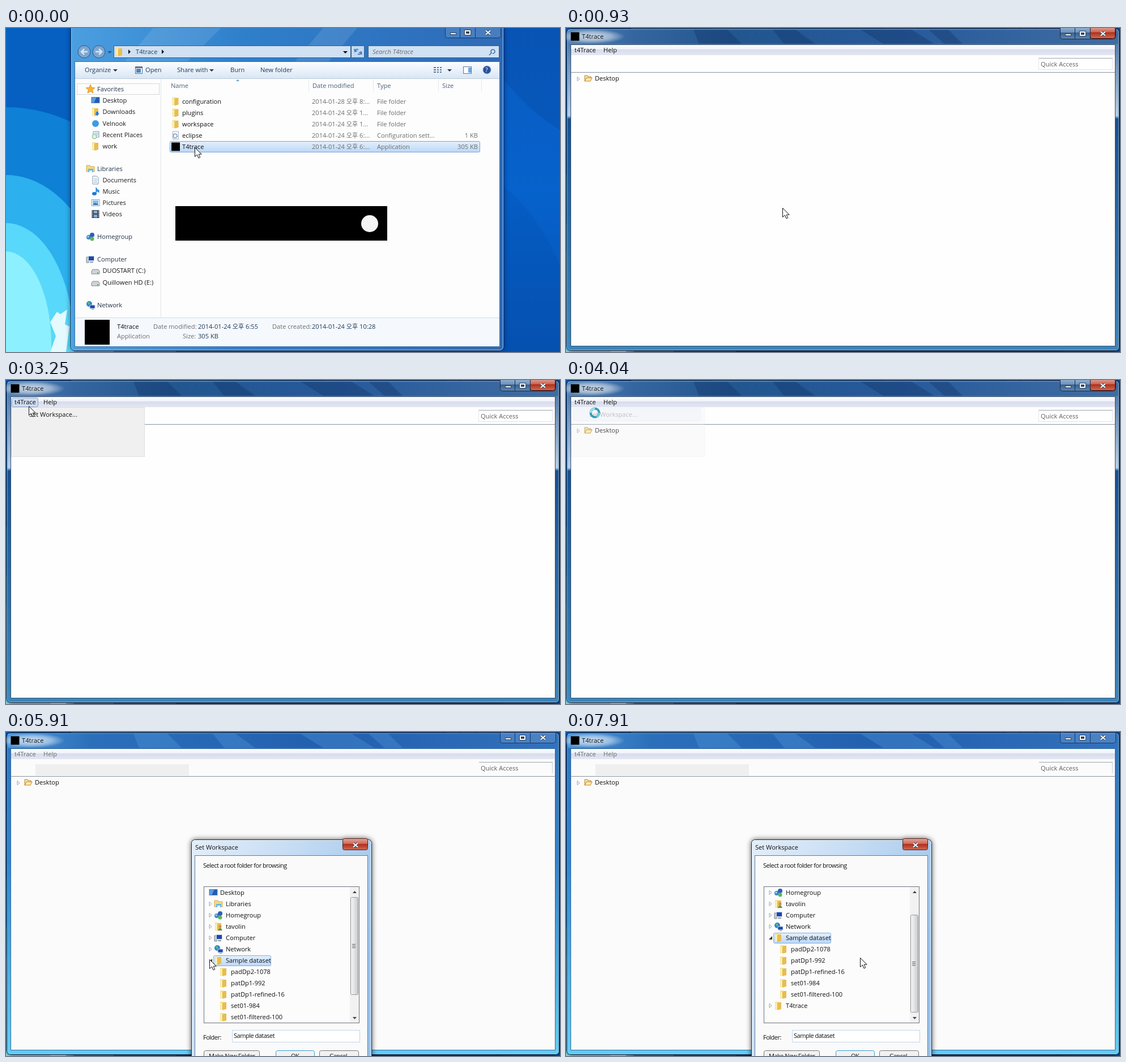
These frames come from a looping animation (978 by 573 pixels, 8 s). An HTML page:

```html
<!DOCTYPE html>
<html lang="en">
<head>
<meta charset="utf-8">
<title>Set Workspace</title>
<style>
html, body { margin: 0; width: 100%; height: 100%; overflow: hidden; background: #0a5cb8; }
svg { position: absolute; left: 0; top: 0; width: 978px; height: 573px; overflow: visible; }
text { font: 11.1px "Open Sans", "Noto Sans CJK KR", "Noto Sans CJK", sans-serif; white-space: pre; }
.tight { font-size: 11px; letter-spacing: -.5px; }
.it { font-style: italic; }
.shade { filter: drop-shadow(0 0 4px rgba(0, 15, 50, .6)); }
#main { transform-origin: 489px 286px; filter: drop-shadow(0 0 6px rgba(0, 10, 40, .8)); }
#dlg { transform-origin: 486px 390px; filter: drop-shadow(0 0 5px rgba(0, 0, 0, .65)); }
</style>
</head>
<body>
<svg id="desk">
  <defs>
    <linearGradient id="skyR" x2="0" y2="1"><stop stop-color="#0a5cc0"/><stop offset=".5" stop-color="#0662cc"/><stop offset="1" stop-color="#0654b4"/></linearGradient>
    <linearGradient id="glass"><stop stop-color="#4b9fe0"/><stop offset=".4" stop-color="#2f7fcb"/><stop offset="1" stop-color="#2f6ab6"/></linearGradient>
    <linearGradient id="bar" x2="0" y2="1"><stop stop-color="#fbfdff"/><stop offset=".5" stop-color="#eaf2fb"/><stop offset="1" stop-color="#dae6f3"/></linearGradient>
    <linearGradient id="pick" x2="0" y2="1"><stop stop-color="#e4effc"/><stop offset="1" stop-color="#bcd8f9"/></linearGradient>
    <linearGradient id="titleOn"><stop stop-color="#5685b8"/><stop offset=".12" stop-color="#34659f"/><stop offset=".3" stop-color="#22568f"/><stop offset=".6" stop-color="#27599a"/><stop offset="1" stop-color="#3f6da3"/></linearGradient>
    <linearGradient id="titleOff"><stop stop-color="#4f97d6"/><stop offset=".15" stop-color="#2b6fba"/><stop offset=".6" stop-color="#225fae"/><stop offset="1" stop-color="#3372bd"/></linearGradient>
    <linearGradient id="edgeOn" x2="0" y2="1"><stop stop-color="#3d6ba2"/><stop offset=".27" stop-color="#b4cde6"/><stop offset=".28" stop-color="#174f93"/><stop offset=".7" stop-color="#2b6fae"/><stop offset="1" stop-color="#3a86bd"/></linearGradient>
    <linearGradient id="edgeOff" x2="0" y2="1"><stop stop-color="#2f74bd"/><stop offset=".4" stop-color="#2f83cf"/><stop offset="1" stop-color="#62cdf2"/></linearGradient>
    <linearGradient id="menubar" x2="0" y2="1"><stop stop-color="#fdfdff"/><stop offset=".45" stop-color="#eef0f8"/><stop offset=".46" stop-color="#d7dcec"/><stop offset="1" stop-color="#e3e7f3"/></linearGradient>
    <linearGradient id="red" x2="0" y2="1"><stop stop-color="#e3a59a"/><stop offset=".45" stop-color="#cb6a58"/><stop offset=".5" stop-color="#b0301b"/><stop offset="1" stop-color="#d06a50"/></linearGradient>
    <linearGradient id="btnBlue" x2="0" y2="1"><stop stop-color="#9db9d8"/><stop offset=".48" stop-color="#6d92bd"/><stop offset=".5" stop-color="#36608f"/><stop offset="1" stop-color="#5c86b5"/></linearGradient>
    <linearGradient id="dlgGlass" x2="1" y2=".5"><stop stop-color="#e3eefa"/><stop offset=".5" stop-color="#c3dbf3"/><stop offset="1" stop-color="#9cc3ea"/></linearGradient>
    <linearGradient id="thumbFill"><stop stop-color="#f6f6f6"/><stop offset=".5" stop-color="#e2e3e4"/><stop offset="1" stop-color="#c6c8cb"/></linearGradient>
    <radialGradient id="glow"><stop stop-color="#fff" stop-opacity=".75"/><stop offset=".6" stop-color="#fff" stop-opacity=".45"/><stop offset="1" stop-color="#fff" stop-opacity="0"/></radialGradient>
    <clipPath id="listClip"><path d="M350 275h273v239h-273z"/></clipPath>

    <g id="folder"><path d="M-6-7h5l1 1v13h-6z" fill="#f6e08c"/><path d="M-2-4l2-2h5v12l-5 1.500h-2z" fill="#e7bd52"/><path d="M-5-5h2v11h-2z" fill="#fdf3c0"/></g>
    <g id="screen"><path d="M-7.500-6h15v11h-15z" fill="#5c7fa8"/><path d="M-6.500-5h13v9h-13z" fill="#1f5cb4"/><path d="M-6.500-5h8l-4 9h-4z" fill="#5a9be0"/></g>
    <g id="down"><use href="#folder"/><path d="M1 0h4v3h2l-4 4.500-4-4.500h2z" fill="#2a7fd8"/></g>
    <circle id="cloud" r="6" fill="#3d9be6"/>
    <g id="page"><path d="M-5-7h7l3 3v11h-10z" fill="#fff" stroke="#8495a8"/><path d="M-3-2h6M-3 1h6M-3 4h6" stroke="#7ea7d6"/></g>
    <g id="recent"><path d="M-4-6h10v10h-10z" fill="#fff" stroke="#7890aa"/><path d="M-2-3h7M-2 0h7" stroke="#5f9bd2"/><circle cx="-2" cy="3" r="4" fill="#e4f0dc" stroke="#7b9"/></g>
    <g id="lib"><path d="M-7-6h6l1 2h7v9h-14z" fill="#f4d983" stroke="#d0aa4a"/><path d="M-4 0h9v6h-9z" fill="#6ab7e8"/><path d="M-2 3h5v3h-5z" fill="#e9f6fd"/></g>
    <g id="note"><ellipse cx="-2" cy="4" rx="4" ry="3" fill="#1f7ad0"/><path d="M1 4v-11q1 4 5 5v4q-2-3-4-2" fill="#3c9be8" stroke="#1f7ad0"/></g>
    <g id="pic"><path d="M-7-5.500h14v11h-14z" fill="#fff" stroke="#8b98a8"/><path d="M-5-4h10v8h-10z" fill="#7fc0ee"/><path d="M-5 4l4-4 2 2 2-1 2 3z" fill="#2f6ca8"/></g>
    <g id="film"><path d="M-6.500-7h13v14h-13z" fill="#3c434c"/><path d="M-3-6h6v5h-6zM-3 1h6v5h-6z" fill="#7db0dd"/><path d="M-5-6v12M5-6v12" stroke="#fff" stroke-dasharray="1.500"/></g>
    <g id="home"><circle cx="-3" cy="1" r="4" fill="#3d84cc"/><circle cx="3" cy="-3" r="4" fill="#2f5fb8"/><circle cx="3" cy="4" r="3.500" fill="#5cb85a"/><circle cx="-4" cy="0" r="1.500" fill="#bfe0f8"/></g>
    <g id="pc"><path d="M-7-4h4v10h-4z" fill="#c7ccd3" stroke="#7f8894"/><path d="M-4-6h11v9h-11z" fill="#d3dae3"/><path d="M-3-5h9v7h-9z" fill="#1c47b0"/><path d="M-1 4h6v2h-6z" fill="#8b95a3"/></g>
    <g id="disk"><path d="M-7 1l2-3h10l2 3v5h-14z" fill="#cfd3d8" stroke="#858c95"/><path d="M3 4h2" stroke="#39b54a" stroke-width="2"/></g>
    <g id="net"><circle cx="-2" cy="-2" r="5" fill="#2d86cf"/><path d="M-5-4q3-3 4 0t-3 3z" fill="#5fc06a"/><path d="M-1 0h9v6h-9z" fill="#1c47b0" stroke="#ccd4de"/><path d="M2 7.500h4" stroke="#7f8894"/></g>
    <g id="user"><use href="#folder"/><circle cx="3" cy="0" r="2.500" fill="#c98f5e"/><path d="M-1 7q4-8 8 0z" fill="#5b8f55"/></g>
    <g id="gear"><path d="M-5-7h10v14h-10z" fill="#f3f6fa" stroke="#a8b4c2"/><circle cx="-1" cy="1" r="3.500" fill="none" stroke="#6c8fb8" stroke-width="2" stroke-dasharray="2 1"/></g>
    <path id="star" d="M0-8l2.300 5.200 5.700.5-4.300 3.800 1.300 5.600-5-3-5 3 1.300-5.600-4.300-3.800 5.700-.5z" fill="#f7b23a" stroke="#d98d1c" stroke-width=".8"/>
    <g id="openFolder"><path d="M-6 5v-10h5l1 2h5v3" fill="#fbe3a4" stroke="#b98530"/><path d="M-6 5l3-6h10l-3 6z" fill="#ffe9ae" stroke="#b98530"/></g>
    <path id="mark" d="M-7.500-7.500h15v15h-15z"/>
    <path id="closed" d="M-2-3.500l4 3.500-4 3.500z" fill="#fff" stroke="#a0a0a0"/>
    <path id="opened" d="M3-3v6h-6z" fill="#333"/>
    <path id="tri" d="M-4-2h8l-4 4z"/>
  </defs>
</svg>
<svg id="main"></svg>
<svg id="dlg"></svg>
<svg id="top"></svg>
<script>
const $ = id => document.getElementById(id);
const ink = '#111', dim = '#6d6d6d', blue = '#1e395b';

// Shape helpers; text is placed by its vertical middle.
const text = (x, y, s, fill = ink, cls = '') => `<text x="${x}" y="${y + 4}" fill="${fill}" class="${cls}">${s}</text>`;
const rect = (x, y, w, h, fill, line, r = 0) => line
  ? `<rect x="${x + .5}" y="${y + .5}" width="${w - 1}" height="${h - 1}" rx="${r}" fill="${fill}" stroke="${line}"/>`
  : `<rect x="${x}" y="${y}" width="${w}" height="${h}" rx="${r}" fill="${fill}"/>`;
const oval = (x, y, rx, ry, fill) => `<ellipse cx="${x}" cy="${y}" rx="${rx}" ry="${ry}" fill="${fill}"/>`;
const icon = (id, x, y, fill = '#000') => `<use href="#${id}" x="${x}" y="${y}" fill="${fill}"/>`;
const path = (d, fill, line = 'none', w = 1) => `<path d="${d}" fill="${fill}" stroke="${line}" stroke-width="${w}"/>`;
const group = (id, s) => `<g id="${id}">${s}</g>`;
const cross = (x, y) => path(`M${x - 4} ${y - 3.5}l8 7m0-7l-8 7`, 'none', '#34455c', 4) +
  path(`M${x - 4} ${y - 3.5}l8 7m0-7l-8 7`, 'none', '#fff', 2.2);

// Minimise, maximise and close, hanging from the top edge.
function buttons(x, y, active) {
  const fill = active ? 'url(#btnBlue)' : 'rgba(255,255,255,.12)', line = active ? '#1b2c44' : '#15396b';
  return rect(x, y - 4, 99, 24, fill, line, 4) +
    (active ? rect(x + 53, y - 3, 45, 22, 'url(#red)', '#4a1410', 4) : '') +
    path(`M${x + 26.5} ${y}v19m27 0v-19`, 'none', line) +
    rect(x + 9, y + 10, 11, 4, '#fff', '#34455c') +
    rect(x + 34, y + 5, 12, 10, '#fff', '#34455c') + rect(x + 37, y + 8, 6, 4, '#34455c') +
    cross(x + 76, y + 10);
}

function desktop() {
  return rect(0, 0, 300, 573, '#0560c2') + oval(0, 560, 330, 420, '#0e80d6') + oval(0, 560, 190, 300, '#2cb0ee') +
    oval(0, 560, 120, 215, '#58d8fa') + oval(0, 560, 80, 165, '#8cf0ff') +
    path('M78 520l12-18 6 4 12-8-4 26 8 4-6 45h-28l10-28z', '#e4faff') +
    rect(300, 0, 678, 573, 'url(#skyR)') +
    path('M878 90Q925 150 978 180V0H878z', 'rgba(0,50,130,.18)') +
    path('M878 280Q940 330 978 420V573H878z', 'rgba(0,60,150,.15)');
}

function explorer() {
  const side = [['star', 108, 'Favorites', 0], ['screen', 128, 'Desktop', 1], ['down', 148, 'Downloads', 1],
    ['cloud', 169, 'Velnook', 1], ['recent', 189, 'Recent Places', 1], ['folder', 209, 'work', 1],
    ['lib', 249, 'Libraries', 0], ['page', 269, 'Documents', 1], ['note', 289, 'Music', 1],
    ['pic', 309, 'Pictures', 1], ['film', 329, 'Videos', 1], ['home', 369, 'Homegroup', 0],
    ['pc', 409, 'Computer', 0], ['disk', 429, 'DUOSTART (C:)', 1], ['disk', 450, 'Quillowen HD (E:)', 1],
    ['net', 490, 'Network', 0]];
  const files = [['folder', 'configuration', '28 오후 8:...', 'File folder', ''], ['folder', 'plugins', '24 오후 1...', 'File folder', ''],
    ['folder', 'workspace', '24 오후 1...', 'File folder', ''], ['gear', 'eclipse', '24 오후 6:...', 'Configuration sett...', '1 KB'],
    ['mark', 'T4trace', '24 오후 6:...', 'Application', '305 KB']];
  const head = '#4c607a';
  return `<g class="shade">${rect(114, -8, 765, 579, 'url(#glass)', '#12305a', 7)}</g>` + rect(115, -7, 763, 577, 'none', '#9accf2', 6) +
    path('M260 0h120l-60 59h-110zM560 0h60l-50 59h-60z', 'rgba(255,255,255,.1)') +
    buttons(775, -2, false) +
    [138, 164].map((x, i) => `<circle cx="${x}" cy="42" r="11" fill="#7ea6cf" stroke="#2f578a"/>` +
      path(i ? `M${x - 6} 42h11m-5-5l5 5-5 5` : `M${x + 6} 42h-11m5-5l-5 5 5 5`, 'none', '#d9e8f6', 2.5)).join('') +
    icon('tri', 183, 43, '#2c5588') +
    rect(190, 31, 419, 22, '#cfe1f3', '#37618f') + rect(609, 31, 24, 22, '#c3d9ef', '#37618f') + rect(639, 31, 232, 22, '#cfe1f3', '#37618f') +
    icon('folder', 200, 42) + path('M216 38l4 4-4 4zM275 38l4 4-4 4z', ink) + text(229, 42, 'T4trace', '#26405f') +
    icon('tri', 599, 43) + path('M616 41q1-5 6-3m-7-1l1 5 4-2M627 43q-1 5-6 3m7 1l-1-5-4 2', 'none', '#2f72c0', 1.5) +
    text(647, 42, 'Search T4trace', dim, 'it') + path('M853 48l4-4a3.500 3.500 0 1 1 2 1', 'none', '#3f70a8', 1.6) +
    rect(121, 59, 751, 505, '#fdfdfd', '#3a6fa8') + rect(122, 60, 749, 29, 'url(#bar)') + rect(122, 89, 749, 1, '#b8c9dc') +
    text(139, 74, 'Organize', blue) + icon('tri', 193, 75, blue) + rect(228, 68, 13, 13, '#fff', '#4e6a8a') + rect(230, 72, 8, 7, '#4b86c6') +
    rect(229, 69, 11, 2, '#d04a3a') + text(246, 74, 'Open', blue) + text(302, 74, 'Share with', blue) + icon('tri', 363, 75, blue) +
    text(396, 74, 'Burn', blue) + text(449, 74, 'New folder', blue) +
    path('M755 70h4m2 0h3m2 0h3M755 74h4m2 0h3m2 0h3M755 78h4m2 0h3m2 0h3', 'none', '#5b7697', 2) + icon('tri', 783, 75, blue) +
    rect(807, 68, 15, 13, '#fff', '#5b7697') + rect(816, 70, 5, 9, '#6fa9de') +
    '<circle cx="849" cy="74" r="7" fill="#25509c" stroke="#8fa8cc"/><text x="846" y="78" fill="#fff" font-weight="700">?</text>' +
    rect(273, 90, 1, 422, '#dfe5ec') +
    side.map(([id, y, s, deep]) => icon(id, 149 + deep * 9, y) + text(161 + deep * 9.5, y, s, deep ? '#1a1a1a' : '#24344a')).join('') +
    text(291, 102, 'Name', head) + text(541, 102, 'Date modified', head) + text(655, 102, 'Type', head) + text(770, 102, 'Size', head) +
    [534, 648, 763, 839].map(x => rect(x, 92, 1, 20, '#e3e8ee')).join('') + path('M406 94l3-3 3 3z', '#5b9bc8') +
    group('pickRow', rect(289, 200, 548, 20, 'url(#pick)', '#7da2ce', 2) + rect(125, 98, 146, 20, 'none', '#d6d6d6')) +
    files.map(([id, name, date, type, size], i) => {
      const y = 129.5 + i * 20.1;
      return icon(id, 299.5, y) + text(311, y, name) + text(540, y, '2014-01-' + date, dim) + text(655, y, type, dim) +
        `<text x="833" y="${y + 4}" fill="${dim}" text-anchor="end">${size}</text>`;
    }).join('') +
    rect(122, 512, 749, 51, '#f5f9fd') + rect(122, 512, 749, 1, '#cfdbe8') + rect(139, 516, 44, 44, '#000') +
    text(196, 528, 'T4trace') + text(196, 545, 'Application', dim) +
    text(260, 528, 'Date modified:', dim) + text(339, 528, '2014-01-24 오후 6:55', blue) + text(312, 545, 'Size:', dim) + text(339, 545, '305 KB', blue) +
    text(470, 528, 'Date created:', dim) + text(540, 528, '2014-01-24 오후 10:28', blue) +
    group('splash', rect(299, 315, 374, 61, '#000') + '<circle cx="642" cy="346" r="15" fill="#f4f4f4"/>');
}

function mainWindow(on) {
  const fg = on ? ink : dim, page = on ? '#fefefe' : '#fbfbfb';
  return rect(1, 1, 976, 570, on ? 'url(#edgeOn)' : 'url(#edgeOff)', '#0b1d36', 6) +
    rect(3, 3, 972, 25, on ? 'url(#titleOn)' : 'url(#titleOff)') +
    path('M225 3h60l25 25h-75zM365 3h40l35 25h-55zM520 3h90l40 25h-90zM640 3h35l25 25h-32z', on ? 'rgba(10,40,90,.3)' : 'rgba(110,180,240,.22)') +
    rect(2, 2, 974, 568, 'none', on ? 'rgba(190,215,240,.65)' : 'rgba(150,205,245,.6)', 5) +
    oval(46, 15, 58, 13, 'url(#glow)') + icon('mark', 16, 15) + text(28, 15, 'T4trace') +
    buttons(872, 0, on) +
    rect(8, 29, 962, 534, page, on ? '#3c5069' : '#3a6ca3') + rect(9, 30, 960, 18, 'url(#menubar)') +
    (on ? group('hot', rect(10, 31, 47, 17, '#cfdcf0', '#8ba3c7', 2)) : '') +
    text(15, 39, 't4Trace', fg) + text(66, 39, 'Help', fg) +
    rect(9, 78, 960, 1, '#8a92a3') +
    (on ? rect(834, 53, 131, 21, '#fff', '#dfe4ea') : rect(964, 54, 1, 19, '#c9d2dc')) + rect(835, 53, 130, 1, '#a0a3a8') +
    text(838, 64, 'Quick Access', '#5f5f5f') +
    icon('closed', 22, 90) + icon('openFolder', 39, 89) + text(51, 89, 'Desktop') +
    (on ? '' : group('trace', rect(52, 57, 271, 20, '#efefef')));
}

const roots = [['lib', 'Libraries'], ['home', 'Homegroup'], ['user', 'tavolin'], ['pc', 'Computer'], ['net', 'Network']];
const sets = ['padDp2-1078', 'patDp1-992', 'patDp1-refined-16', 'set01-984', 'set01-filtered-100'];

function dialog() {
  const node = ([id, s], y) => icon('closed', 361, y) + icon(id, 375, y) + text(388, y, s);
  const button = (x, w, s, line, tx) => rect(x, 563, w, 24, '#f1f1f1', line, 3) + text(tx, 573, s, ink, 'tight');
  const last = ['folder', 'T4trace'];
  return rect(327, 190, 319, 420, 'url(#dlgGlass)', '#1c2733', 6) + rect(328, 191, 317, 418, 'none', 'rgba(255,255,255,.75)', 5) +
    text(334, 204, 'Set Workspace') + rect(594, 188, 45, 21, 'url(#red)', '#5b2018', 3) + cross(617, 200) +
    rect(333, 218, 306, 400, '#fafafa', '#5f7d9c') +
    text(348, 236, 'Select a root folder for browsing', ink, 'tight') +
    rect(349, 273, 275, 242, '#fcfcfc', '#6f747c') +
    `<g clip-path="url(#listClip)">` + group('tree',
      group('pickUser', rect(366, 335, 59, 19, '#f0f0f0', '#dcdcdc', 2)) +
      group('pickSet', rect(366, 395, 102, 19, 'url(#pick)', '#84acdd', 2)) +
      icon('screen', 366, 284) + text(378, 284, 'Desktop') +
      roots.map((r, i) => node(r, 304 + i * 20)).join('') +
      icon('folder', 375, 404) + text(388, 404, 'Sample dataset') +
      group('shut', icon('closed', 361, 404) + node(last, 424)) +
      group('open', icon('opened', 361, 404) + sets.map((s, i) => icon('folder', 384, 424 + i * 20) + text(397, 424 + i * 20, s)).join('') + node(last, 524))) +
    '</g>' +
    group('scroll', rect(607, 274, 16, 240, '#f1f1f1') + path('M612 285l3.500-4 3.500 4zM612 504l3.500 4 3.500-4z', '#444') +
      group('thumb', rect(608, 292, 14, 173, 'url(#thumbFill)', '#979797', 2) + path('M611 375.500h6m-6 3h6m-6 3h6', 'none', '#555'))) +
    text(348, 540, 'Folder:', ink, 'tight') + rect(399, 527, 226, 22, '#fff', '#c3d6ea') +
    '<text id="field" x="402" y="541" fill="#111" class="tight"></text>' +
    button(349, 99, 'Make New Folder', '#777', 358) + button(476, 69, 'OK', '#3c9fd6', 503) + button(553, 70, 'Cancel', '#777', 571);
}

$('desk').innerHTML += desktop() + explorer();
$('main').innerHTML = group('on', mainWindow(true)) + group('off', mainWindow(false));
$('dlg').innerHTML = dialog();
$('top').innerHTML =
  group('menu', rect(9, 48, 236, 88, '#f0f0f0', '#dedede') + group('item', rect(12, 50, 226, 23, '#d9e3f0', '#c3d3e6', 2)) + text(41, 61, 'Set Workspace...')) +
  group('arrow', path('M.5.5v16l4-3.500 2.500 6 2.700-1.200-2.500-5.600h5z', '#fff', '#111')) +
  group('ring', '<circle cx="51" cy="58" r="7.500" fill="none" stroke="#2f9fb8" stroke-width="4"/>' +
    path('M43.500 58a7.500 7.500 0 0 1 7.500-7.500', 'none', '#a9e3ec', 3) + path('M58.500 58a7.500 7.500 0 0 1-5 7', 'none', '#7fcfe0', 3));

// Tables of [time, values...]; each row holds until the next.
const cursor = [[0, 333, 211], [500, 335, 214], [630, 337, 217], [780, 355, 262], [930, 382, 318],
  [1200, 366, 302], [1333, 300, 250], [1466, 200, 182], [1600, 116, 126], [1733, 62, 99], [1866, 39, 90], [2000, 56, 99], [2130, 75, 107],
  [2290, 76, 76], [2430, 60, 56], [2560, 46, 44], [2700, 36, 39], [3233, 40, 46], [3366, 47, 53], [3500, 52, 57],
  [4710, 311, 187], [4843, 430, 390], [4976, 532, 553], [5109, 505, 520], [5242, 445, 445], [5375, 402, 406], [5508, 372, 403], [5640, 359, 402],
  [6030, 380, 425], [6170, 430, 475], [6300, 490, 525], [6440, 525, 550], [6880, 530, 530], [7030, 527, 490], [7175, 523, 445], [7320, 520, 410], [7470, 519, 399]];
// Opacity, scale, tilt, dx, dy
const rise = [[0, 0, .93, -8, -2, -8], [630, .58, .955, -5, -1.5, -5], [780, .9, .985, -2, -.5, -2], [930, 1, 1, 0, 0, 0]];
const pop = [[0, 0, .92], [4160, .35, .94], [4290, .75, .98], [4430, 1, 1]];
const menuFade = [[0, 0], [3100, 1], [3780, .7], [3910, .45], [4040, .26], [4160, 0]];
const at = (table, t) => table.findLast(row => t >= row[0]).slice(1);
const show = (id, yes) => { $(id).style.display = yes ? '' : 'none'; };

function draw(t) {
  const [x, y] = at(cursor, t), [mo, ms, tilt, dx, dy] = at(rise, t), [po, ps] = at(pop, t);
  const picked = t >= 5508, grown = t >= 5760, busy = t >= 3780 && t < 4430, back = t >= 4160;
  const shift = t >= 7175 ? 40 : 0;
  show('splash', t < 500);
  show('pickRow', t < 500);
  $('main').style.opacity = mo;
  $('main').style.transform = ms === 1 ? 'none' : `translate(${dx}px,${dy}px) perspective(2070px) rotateX(${tilt}deg) scale(${ms})`;
  show('on', !back);
  show('off', back);
  show('hot', t >= 2560 && t < 3780);
  show('trace', t >= 4710);
  $('menu').style.opacity = at(menuFade, t)[0];
  show('item', t >= 3366);
  $('dlg').style.opacity = po;
  $('dlg').style.transform = `scale(${ps})`;
  show('pickUser', !picked);
  show('pickSet', picked);
  show('shut', !grown);
  show('open', grown);
  show('scroll', grown);
  $('tree').setAttribute('transform', `translate(0 ${-shift})`);
  $('thumb').setAttribute('transform', `translate(0 ${shift * .78})`);
  $('field').textContent = picked ? 'Sample dataset' : 'tavolin';
  show('arrow', !busy);
  show('ring', busy);
  $('arrow').setAttribute('transform', `translate(${x} ${y})`);
}

const start = performance.now();
function tick() {
  draw((performance.now() - start) % 8000);
  requestAnimationFrame(tick);
}
tick();
</script>
</body>
</html>
```
